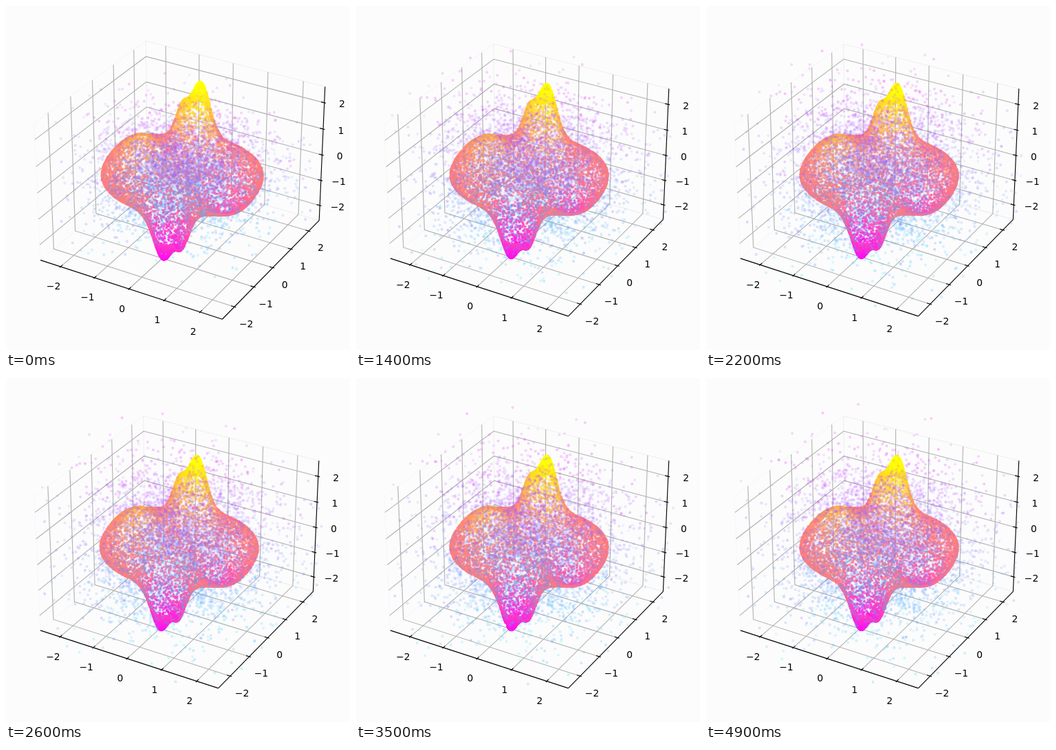
An HTML page with a canvas for the animation above (5 s loop, 500 by 500 pixels).

```html
<!DOCTYPE html>
<html lang="en">
<head>
<meta charset="utf-8">
<title>Point cloud around a surface</title>
<style>
  html, body { margin: 0; width: 100%; height: 100%; overflow: hidden; background: #fcfcfc; }
  svg, canvas { position: absolute; left: 0; top: 0; width: 500px; height: 500px; }
  text { font: 13.89px "DejaVu Sans", sans-serif; text-anchor: middle; }
  path { fill: none; stroke-width: 1.11; }
  .grid { stroke: #b0b0b0; }
  .axis { stroke: #000; }
</style>
</head>
<body>
<svg id="axes" viewBox="0 0 500 500"></svg>
<canvas id="dots" width="500" height="500"></canvas>
<script>
const STEP = 100, STEPS = 50;
const LIM = 2.604, HALF = 0.5714, HALF_Z = 0.4286;
const C30 = Math.sqrt(3) / 2;
const WIDE = { s: 2650, x: 256.2, y: 243.7 };
const SNUG = { s: 2593, x: 251.7, y: 243.9 };

const svg = document.getElementById('axes');
const ctx = document.getElementById('dots').getContext('2d');

function rng(seed) {
  return () => {
    seed = seed + 0x6D2B79F5 | 0;
    let t = Math.imul(seed ^ seed >>> 15, 1 | seed);
    t = t + Math.imul(t ^ t >>> 7, 61 | t) ^ t;
    return ((t ^ t >>> 14) >>> 0) / 4294967296;
  };
}

const gauss = rand =>
  Math.sqrt(-2 * Math.log(1 - rand())) * Math.cos(2 * Math.PI * rand());

// Perspective camera: elevation 30, azimuth -60, distance 10
function project(cam, x, y, z) {
  const X = x * HALF / LIM, Y = y * HALF / LIM, Z = z * HALF_Z / LIM;
  const near = X * C30 / 2 - Y * 0.75 + Z / 2;
  const k = cam.s / (10 - near);
  return [
    cam.x + k * (X * C30 + Y / 2),
    cam.y - k * (-X / 4 + Y * C30 / 2 + Z * C30),
    near
  ];
}

function drawAxes(cam) {
  const L = LIM, out = [];
  const line = (cls, pts, extra = '') => {
    const d = pts.map(p => project(cam, ...p).slice(0, 2).map(n => n.toFixed(2)).join(' '));
    out.push(`<path class="${cls}" d="M${d.join('L')}" ${extra}/>`);
  };
  const label = (p, dx, dy, n) => {
    const [x, y] = project(cam, ...p);
    out.push(`<text x="${(x + dx).toFixed(1)}" y="${(y + dy + 5.1).toFixed(1)}">${n < 0 ? '−' : ''}${Math.abs(n)}</text>`);
  };
  line('pane', [[-L, -L, -L], [-L, L, -L], [-L, L, L], [-L, -L, L], [-L, -L, -L]], 'stroke="#f7f7f7"');
  line('pane', [[-L, -L, -L], [L, -L, -L], [L, L, -L], [-L, L, -L]], 'stroke="#f4f4f4"');
  line('pane', [[-L, L, -L], [L, L, -L], [L, L, L], [-L, L, L], [-L, L, -L]], 'stroke="#f0f0f0"');
  for (let t = -2; t <= 2; t++) {
    line('grid', [[t, -L, -L], [t, L, -L], [t, L, L]]);
    line('grid', [[L, t, -L], [-L, t, -L], [-L, t, L]]);
    line('grid', [[-L, -L, t], [-L, L, t], [L, L, t]]);
  }
  line('axis', [[-L, -L, -L], [L, -L, -L]]);
  line('axis', [[L, -L, -L], [L, L, -L]]);
  line('axis', [[L, L, -L], [L, L, L]]);
  const a = L + 0.045, b = L - 0.09;
  for (let t = -2; t <= 2; t++) {
    line('axis', [[t, -a, -L], [t, -b, -L]]);
    line('axis', [[a, t, -L], [b, t, -L]]);
    line('axis', [[a, L, t], [b, L, t]]);
    label([t, -L, -L], -10.2, 28.3, t);
    label([L, t, -L], 17.3, 24.2, t);
    label([L, L, t], 25.8, 1.5, t);
  }
  svg.innerHTML = out.join('');
}

// Bumps: u across the view, v into it, spreads, height, depth of the opposite dip
const BUMPS = [
  { u: 0.47, v: 1.5, su: 0.24, sv: 0.42, up: 2.35, down: 2.05 },
  { u: 0.02, v: 1.95, su: 0.18, sv: 0.55, up: 1.15, down: 1.15 },
  { u: -1.05, v: 0.75, su: 0.4, sv: 0.6, up: 0.85, down: 0.85 }
];

const bell = (b, u, v) =>
  Math.exp(-(((u - b.u) / b.su) ** 2 + ((v - b.v) / b.sv) ** 2) / 2);

const height = (u, v) =>
  BUMPS.reduce((z, b) => z + b.up * bell(b, u, v) - b.down * bell(b, -u, -v), 0);

function dot(x, y, r, color) {
  ctx.fillStyle = color;
  ctx.beginPath();
  ctx.arc(x, y, r, 0, 7);
  ctx.fill();
}

const clamp = v => Math.max(0, Math.min(1, v));

function drawSurface(cam, step) {
  const rand = rng(901 + step * 37), pts = [];
  const add = (u, v) => {
    if (u * u + v * v > 4.05) return;
    const z = height(u, v);
    const [px, py, near] = project(cam, C30 * u - v / 2, u / 2 + C30 * v, z);
    pts.push({ px, py, near, z });
  };
  for (let i = 0; i < 6800; i++) {
    const w = rand(), r = 2.01 * Math.sqrt(1 - w * w), a = 2 * Math.PI * rand();
    add(r * Math.cos(a), r * Math.sin(a));
  }
  // The steep bumps need more samples
  BUMPS.forEach((b, k) => {
    for (let i = 0; i < [1500, 1100, 300][k]; i++) {
      const side = i % 2 ? 1 : -1;
      add(side * (b.u + gauss(rand) * b.su), side * (b.v + gauss(rand) * b.sv));
    }
  });
  pts.sort((a, b) => a.near - b.near);
  for (const p of pts) {
    const v = clamp(0.5 + p.z / 4.3);
    const alpha = 0.45 + 0.4 * clamp(0.5 + p.near / 0.9);
    dot(p.px, p.py, 1.75,
      `rgba(255,${Math.round(255 * v)},${Math.round(255 * (1 - v))},${alpha.toFixed(2)})`);
  }
}

const seedCloud = rng(4242);
const cloud = Array.from({ length: 5000 }, () => ({
  x: gauss(seedCloud), y: gauss(seedCloud), z: gauss(seedCloud),
  ph: seedCloud() * 6.28, rate: 0.08 + 0.2 * seedCloud()
}));

function drawCloud(cam, step) {
  const t = step * STEP / 1000;
  const flat = 1 + 0.12 * (1 - Math.exp(-t / 0.5));
  const tall = 0.85 + 0.5 * (1 - Math.exp(-t / 1.5));
  for (const c of cloud) {
    const a = c.ph + step * c.rate;
    const x = c.x * flat + 0.07 * Math.sin(a);
    const y = c.y * flat + 0.07 * Math.cos(a * 1.3);
    const z = c.z * tall + 0.05 * Math.sin(a * 0.7);
    const [px, py, near] = project(cam, x, y, z);
    const v = clamp(0.5 + z / (6.4 * tall));
    const alpha = 0.07 + 0.22 * clamp(0.5 + near / 1.5);
    dot(px, py, 2.05,
      `rgba(${Math.round(255 * v)},${Math.round(255 * (1 - v))},255,${alpha.toFixed(3)})`);
  }
}

let shownStep = -1, shownCam = null;

function render(step) {
  const cam = step === 0 ? WIDE : SNUG;
  if (cam !== shownCam) drawAxes(shownCam = cam);
  ctx.clearRect(0, 0, 500, 500);
  drawSurface(cam, step);
  drawCloud(cam, step);
}

const start = performance.now();

function tick() {
  const step = Math.floor((performance.now() - start) / STEP) % STEPS;
  if (step !== shownStep) render(shownStep = step);
  requestAnimationFrame(tick);
}
tick();
</script>
</body>
</html>
```
